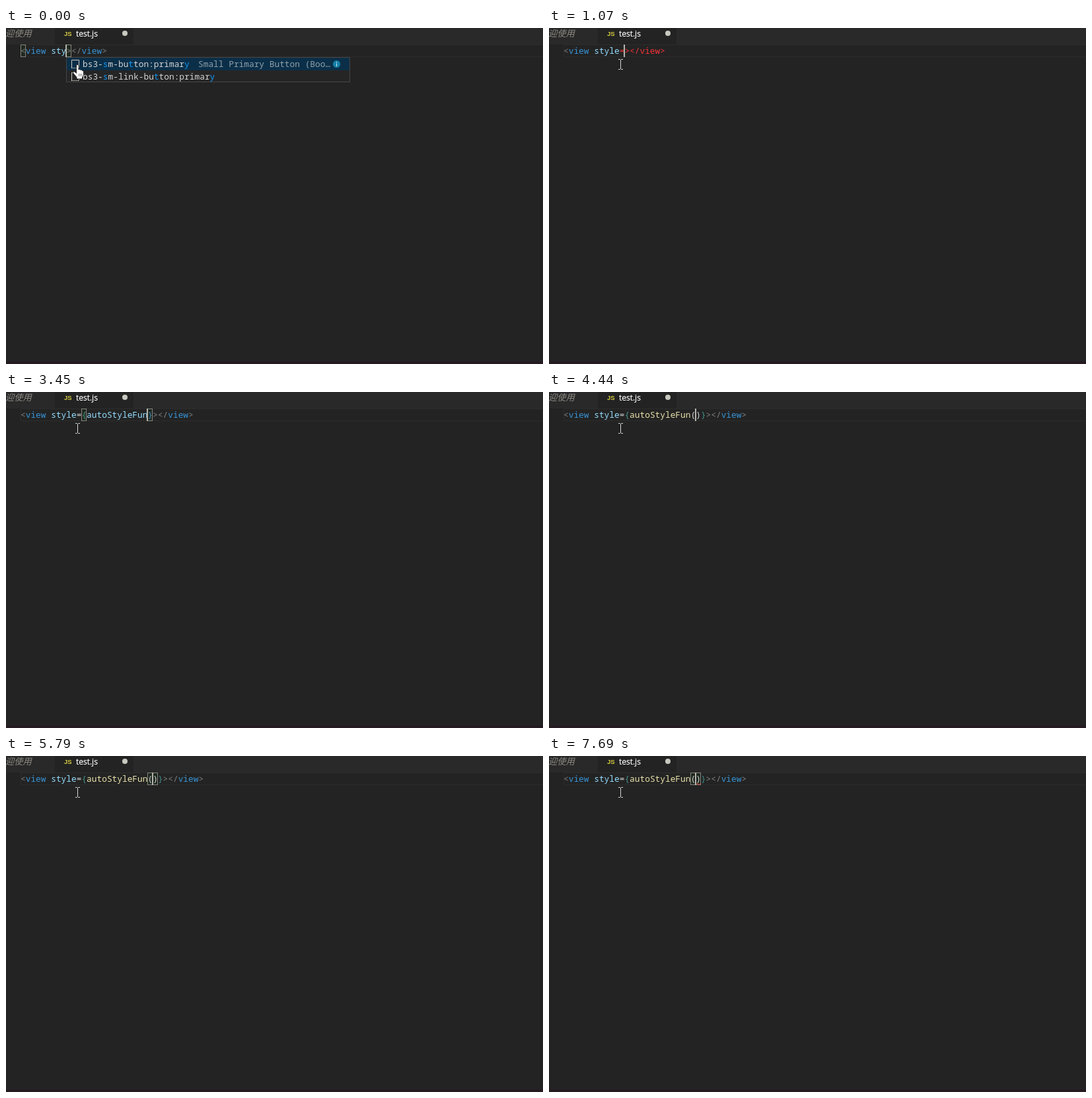
Recreate the animation shown at these times as an HTML page. Size 813x508 px, loop 8 s.

```html
<!DOCTYPE html>
<html lang="en">
<head>
<meta charset="utf-8">
<title>Editor typing</title>
<style>
  html, body { margin: 0; width: 100%; height: 100%; overflow: hidden; background: #232323; }
  svg { display: block; width: 813px; height: 508px; }
  text { white-space: pre; }
  .mono { font: 12.83px "Noto Sans Mono", "DejaVu Sans Mono", monospace; }
  .ui { font: 12px "Open Sans", "Noto Sans", sans-serif; }
  .cjk { font: italic 13.3px "Noto Sans CJK SC", "Noto Sans CJK", sans-serif; }
  .icon { font: bold 9.5px "Liberation Sans", sans-serif; }
</style>
</head>
<body>
<svg viewBox="0 0 813 508">
  <rect width="813" height="508" fill="#232323"/>
  <rect width="813" height="25" fill="#292929"/>
  <rect x="74" width="119" height="25" fill="#232323"/>
  <text class="cjk" x="-1" y="13" fill="#8c8a82">迎使用</text>
  <text class="icon" x="88" y="12" fill="#d6cb41">JS</text>
  <text class="ui" x="106" y="13" fill="#fff" stroke="#fff" stroke-width=".2">test.js</text>
  <circle cx="180" cy="8" r="4" fill="#c8c8c0"/>
  <path d="M813 25.5H22.5V43.5H813" fill="none" stroke="#2c2c2c"/>
  <rect y="504" width="813" height="4" fill="#251b22"/>

  <g id="boxes" fill="#0064001a" stroke="#85857f"></g>
  <text id="code" class="mono" x="22" y="39"></text>
  <path id="waves" fill="none" stroke="#e8403c"/>
  <rect id="caret" y="25" width="2" height="19" fill="#b4b4ae"/>

  <g id="popup">
    <rect x="91.5" y="44.5" width="429" height="37" fill="#252526" stroke="#454545"/>
    <rect x="92" y="45" width="428" height="19" fill="#0b2f49"/>
    <g fill="none" stroke="#d0cdc2">
      <path d="M99.5 60V48.5H110.5V60M99.5 79V67.5H110.5V79"/>
      <path d="M99 60.5H111M99 79.5H111" stroke-dasharray="2 1"/>
    </g>
    <text id="item0" class="mono" x="116" y="59"></text>
    <text id="item1" class="mono" x="116" y="78"></text>
    <text class="mono" x="291" y="59" fill="#8fa0a9">Small Primary Button (Boo…</text>
    <circle cx="500.5" cy="54.5" r="5.5" fill="#1580a8"/>
    <path d="M500.5 51V52.5M500.5 53.5V58" stroke="#d5e8f0"/>
    <path d="M106.5 56.5Q108 54 110 56.5V63Q112 61.5 113 63.5Q115 62.5 115.5 64.5Q117.5 64 117.5 66.5V70Q117 73 115.5 74.5V77H107V74.5L101.5 68Q101 65 104 66L106.5 68.5Z"
          fill="#fff" stroke="#151515" stroke-width=".9" stroke-linejoin="round"/>
    <path d="M110.5 69V73M112.5 69V73M114.5 69V73" stroke="#555" stroke-width=".7"/>
  </g>
  <path id="beam" d="M105 47.5H107.5L108.5 48.5L109.5 47.5H112M108.5 48V62M105 62.5H107.5L108.5 61.5L109.5 62.5H112"
        fill="none" stroke="#d8d8d8"/>
</svg>
<script>
const LOOP = 8000, LEFT = 22, CELL = 7.698;
const C = { tag: '#808080', name: '#3794d6', attr: '#93deff', plain: '#d4d4d4', fn: '#e9e2ab',
            brace: '#438f88', blue: '#4388c0', red: '#f43338', hit: '#0f97f5' };
const $ = id => document.getElementById(id);
const colX = col => LEFT + col * CELL;
const esc = s => s.replace(/&/g, '&amp;').replace(/</g, '&lt;').replace(/>/g, '&gt;');
const span = (s, fill) => `<tspan fill="${fill}">${esc(s)}</tspan>`;

// time, attribute text, caret column (negative = hidden), boxed columns, squiggle ranges, colour mode
const broken = [[1, 5], [11, 15], [19, 20]];
const fixed = [[1, 5], [11, 17], [21, 22]];
const call = '={autoStyleFun()}', quoted = '={autoStyleFun(“)}';
const steps = [
  [0, 'sty', 9, [0, 9]],
  [140, 'sty', -1, [0, 9]],
  [400, 'styl', 10, [0, 10]],
  [550, 'style', 11, [0, 11]],
  [1070, 'style=', 12, [], [], 'error'],
  [1370, 'style=', 12, [], broken, 'error'],
  [1520, 'style=', -1, [], broken, 'error'],
  [2030, 'style=', 12, [], broken, 'error'],
  [2180, 'style={}', 13, [12, 13], fixed],
  [2340, 'style={}', 14, [0, 14], fixed],
  [2760, 'style={}', -1, [0, 14]],
  [3020, 'style={}', 13, [12, 13]],
  [3450, 'style={autoStyleFun}', 25, [12, 25], [], 'blue'],
  [3910, 'style={autoStyleFun}', -1, [12, 25], [], 'blue'],
  [4440, 'style' + call, 26, []],
  [4560, 'style' + call, 26, [25, 26]],
  [4680, 'style' + call, 27, [12, 27]],
  [5110, 'style' + call, -1, [12, 27]],
  [5640, 'style' + call, 27, [12, 27]],
  [5790, 'style' + call, 26, [25, 26]],
  [6350, 'style' + call, -1, [25, 26]],
  [6600, 'style' + quoted, 27, [25, 27], [], 'blue'],
  [7000, 'style' + quoted, 27, [25, 27], [[26, 27]], 'blue'],
  [7130, 'style' + quoted, -1, [25, 27], [[26, 27]], 'blue'],
  [7560, 'style' + quoted, 27, [25, 27], [[26, 27]], 'blue'],
  [7690, 'style' + call, 26, [25, 26], [[26, 27]]]
];

function paintCode(attr, mode) {
  const [, word, eq, open, fn, args, close] = attr.match(/^(\w+)(=?)(\{?)(\w*)([^}]*)(\}?)$/);
  const head = span('<', C.tag) + span('view', C.name) + span(' ' + word, C.attr);
  if (mode === 'error') return head + span('=></view>', C.red);
  return head + span(eq, C.plain) + span(open, C.brace) + span(fn, args ? C.fn : C.attr) +
    span(args, C.plain) + span(close, mode === 'blue' ? C.blue : C.brace) +
    span('></', C.tag) + span('view', C.name) + span('>', C.tag);
}

function wave([from, to]) {
  const end = colX(to);
  let x = colX(from), d = `M${x} 43.3`;
  for (let up = true; x + 2.5 <= end + .5; up = !up) d += `L${x += 2.5} ${up ? 41.5 : 43.3}`;
  return d;
}

function paintItem(id, label, hits) {
  $(id).innerHTML = [...label].map((c, i) => span(c, hits.includes(i) ? C.hit : C.plain)).join('');
}

let shown;
function draw(time) {
  const step = steps.findLast(s => s[0] <= time);
  if (step === shown) return;
  shown = step;
  const [start, attr, caret, boxes, waves = [], mode] = step;
  $('code').innerHTML = paintCode(attr, mode);
  $('boxes').innerHTML = boxes.map(col =>
    `<rect x="${Math.round(colX(col)) + .5}" y="25.5" width="7" height="18"/>`).join('');
  $('waves').setAttribute('d', waves.map(wave).join(''));
  $('caret').setAttribute('x', Math.round(colX(caret)) - 1);
  $('caret').style.display = caret < 0 ? 'none' : '';
  $('popup').style.display = start < 400 ? '' : 'none';
  $('beam').style.display = start < 400 ? 'none' : '';
}

paintItem('item0', 'bs3-sm-button:primary', [4, 9, 20]);
paintItem('item1', 'bs3-sm-link-button:primary', [4, 14, 25]);

const begin = performance.now();
function tick() {
  draw((performance.now() - begin) % LOOP);
  requestAnimationFrame(tick);
}
tick();
</script>
</body>
</html>
```
